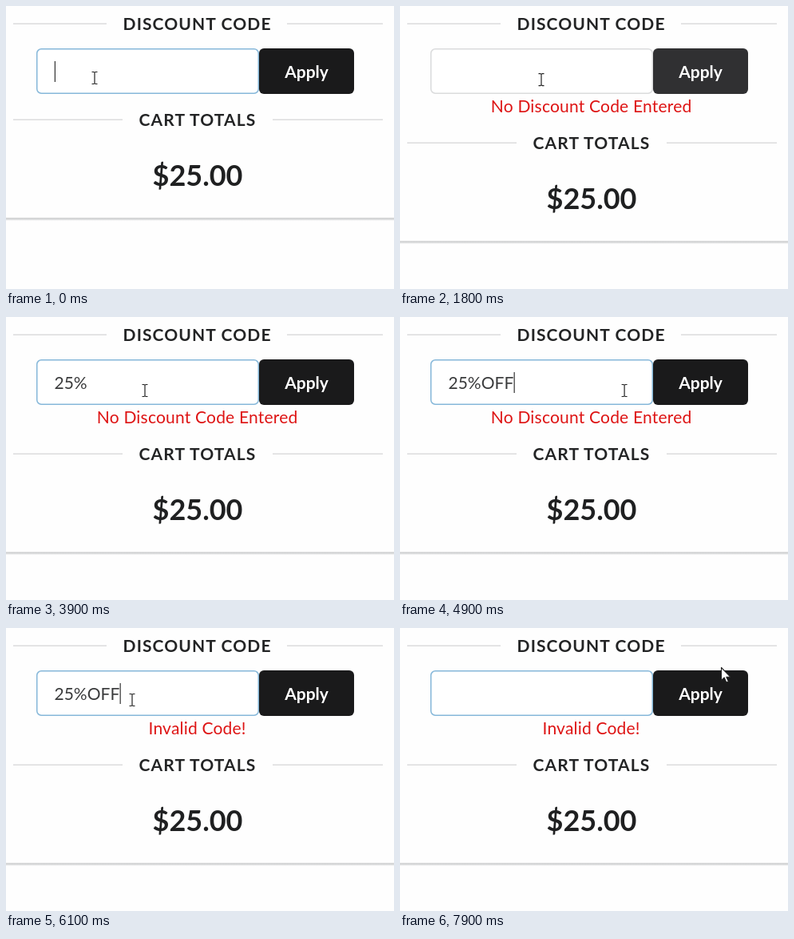
These frames come from a looping animation (486 by 354 pixels, 8 s). An HTML page:

```html
<!DOCTYPE html>
<html lang="en">
<head>
<meta charset="utf-8">
<title>Discount code</title>
<style>
  html, body { margin: 0; width: 100%; height: 100%; overflow: hidden; background: #fefefe; }
  svg { display: block; width: 486px; height: 354px; font: 21px Lato, sans-serif; }
  .title { font-weight: 700; letter-spacing: 1.1px; fill: #232425; }
  .mid { text-anchor: middle; }
  .rule { stroke: #dcdcdd; stroke-width: 1.5; }
  .price { font-size: 36px; font-weight: 700; fill: #1f2021; }
  .error { fill: #de1414; letter-spacing: .2px; }
  .apply { font-weight: 700; fill: #fff; }
</style>
</head>
<body>
<svg viewBox="0 0 486 354">
  <defs>
    <linearGradient id="edge" x1="0" y1="0" x2="0" y2="1">
      <stop offset="0" stop-color="#d0d1d2"/>
      <stop offset=".45" stop-color="#d6d7d8"/>
      <stop offset="1" stop-color="#fefefe"/>
    </linearGradient>
  </defs>

  <path class="rule" d="M9 22.2H126M352 22.2H472"/>
  <text class="title mid" x="239.6" y="30">DISCOUNT CODE</text>

  <rect id="field" x="38.75" y="53.75" width="277.5" height="55.5" rx="5.5" fill="#fff" stroke-width="1.5"/>
  <text id="value" x="60.5" y="90" fill="#3a3b3c"></text>
  <rect id="caret" y="69" width="1.2" height="26" fill="#333"/>
  <rect id="button" x="317" y="53" width="119" height="57" rx="6"/>
  <text class="apply mid" x="376.5" y="90">Apply</text>
  <text id="error" class="error mid" x="239.6" y="133"></text>

  <g id="totals">
    <path class="rule" d="M9 142.2H146M334 142.2H472"/>
    <text class="title mid" x="240" y="150">CART TOTALS</text>
    <text class="price mid" x="240" y="225">$25.00</text>
    <rect y="264.8" width="486" height="4" fill="url(#edge)"/>
  </g>

  <g id="pointer">
    <path id="beam" d="M-3.5 -7.5H-1.2L0 -6.7L1.2 -7.5H3.5M0 -6.7V6.7M-3.5 7.5H-1.2L0 6.7L1.2 7.5H3.5" fill="none" stroke="#222" stroke-width="1.2"/>
    <path id="arrow" d="M.5 .5V16.5L4.2 13L6.8 19L9.3 17.9L6.8 12.2H11.8Z" fill="#fff" stroke="#222" stroke-width="1.1" stroke-linejoin="round"/>
    <path id="hand" d="M-1.8 12V0Q-1.8 -1.8 0 -1.8T1.8 0V6Q3 4.8 4.6 6.6Q6.4 5.5 7.6 7.5Q10 6.7 10 9.5V13.5Q10 16 8.3 18V20.5H-.2V18.5L-5 12.3Q-6.3 10.3 -4.6 9.6Q-3.3 9.2 -1.8 12ZM1.8 6V10.5M4.6 6.6V10.5M7.6 7.5V10.7" fill="#fff" stroke="#222" stroke-width="1.1" stroke-linejoin="round"/>
  </g>
</svg>
<script>
const LOOP = 8000, BLINK = 530, FADE = 100;
const $ = id => document.getElementById(id);

// time, x, y of the pointer's hot spot
const path = [
  [0, 111, 90], [100, 111, 90], [800, 387, 97], [1150, 387, 97],
  [1850, 174, 92], [4750, 174, 92], [5050, 386, 92], [5200, 386, 92],
  [5450, 394, 190], [5600, 394, 190], [6000, 158, 90], [7450, 158, 90],
  [7680, 300, 51], [7900, 402, 49], [8000, 403, 49]
];
// time and whether the field (1) or the button (0) gets focus
const focus = [[-100, 1], [920, 0], [2100, 1], [5150, 0], [6000, 1]];
const errors = [[0, ""], [1000, "No Discount Code Entered"], [5700, "Invalid Code!"]];

const code = "25%OFF";
const typed = [[-100, ""]];
[2700, 2900, 3200, 3950, 4150, 4400].forEach((t, i) => typed.push([t, code.slice(0, i + 1)]));
for (let i = 1; i <= 6; i++) typed.push([6600 + 100 * i, code.slice(0, 6 - i)]);

const latest = (steps, t) => steps.filter(s => s[0] <= t).pop();
const lerp = (a, b, k) => a + (b - a) * k;
const mix = (a, b, k) => `rgb(${a.map((v, i) => Math.round(lerp(v, b[i], k)))})`;
const inside = (x, y, left, right) => x >= left && x < right && y >= 53 && y <= 110;
const show = (id, on) => $(id).setAttribute("visibility", on ? "visible" : "hidden");

function pointerAt(t) {
  const i = Math.max(1, path.findIndex(p => p[0] > t));
  const [a, b] = [path[i - 1], path[i]];
  const k = (t - a[0]) / (b[0] - a[0]);
  const e = k * k * (3 - 2 * k);
  return [lerp(a[1], b[1], e), lerp(a[2], b[2], e)];
}

function draw(t) {
  const [x, y] = pointerAt(t);
  const overField = inside(x, y, 38, 317), overButton = inside(x, y, 317, 436);
  $("pointer").setAttribute("transform", `translate(${x.toFixed(1)} ${y.toFixed(1)})`);
  show("beam", overField);
  show("hand", overButton);
  show("arrow", !overField && !overButton);

  const [since, active] = latest(focus, t);
  const k = Math.min(1, (t - since) / FADE);
  const f = active ? k : 1 - k;
  $("field").setAttribute("stroke", mix([218, 219, 220], [133, 183, 217], f));
  $("button").setAttribute("fill", mix([48, 48, 50], overButton ? [39, 41, 42] : [26, 26, 27], f));

  const [keyTime, text] = latest(typed, t);
  $("value").textContent = text;
  const width = text ? $("value").getComputedTextLength() : 0;
  $("caret").setAttribute("x", 60.8 + width);
  const idle = t - Math.max(keyTime, since);
  show("caret", active && Math.floor(idle / BLINK) % 2 === 0);

  const message = latest(errors, t)[1];
  $("error").textContent = message;
  $("totals").setAttribute("transform", `translate(0 ${message ? 29 : 0})`);
}

const start = performance.now();
function tick() {
  draw((performance.now() - start) % LOOP);
  requestAnimationFrame(tick);
}
tick();
</script>
</body>
</html>
```
